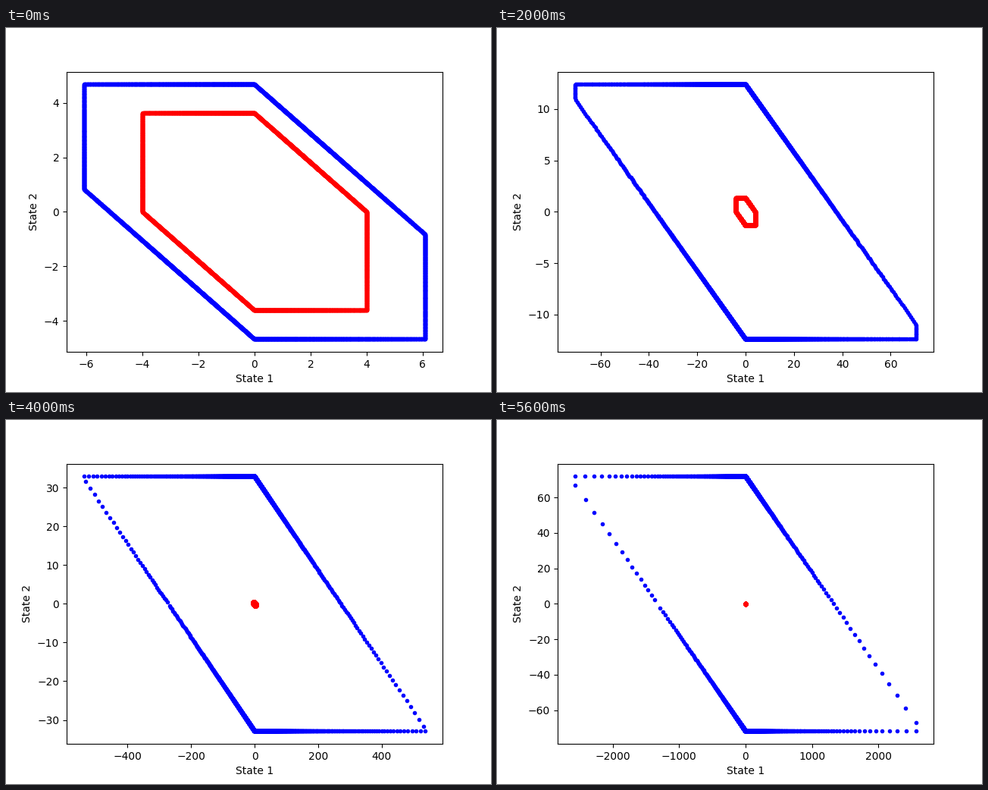
Recreate the animation shown at these times as a matplotlib script. Size 640x480 px, loop 5800 ms.

```python
import numpy as np
import matplotlib.pyplot as plt
from matplotlib.animation import FuncAnimation

FRAMES = 29
INTERVAL = 200
INNER = 4.0    # half-width of the red set
OUTER = 4.24   # base size of the blue set

# One boundary point per tenth of a degree, open at +-180 degrees
theta = np.arange(-1799, 1800) * np.pi / 1800
cos, sin = np.cos(theta), np.sin(theta)

fig, ax = plt.subplots(figsize=(6.4, 4.8), dpi=100)


def hexagon(width, bound, s):
    """Ray hits on |x| <= width, |s y| <= bound, |x + s y| <= bound."""
    gauge = np.maximum.reduce([
        np.abs(cos) / width,
        np.abs(s * sin) / bound,
        np.abs(cos + s * sin) / bound,
    ])
    return cos / gauge, sin / gauge


def draw(i):
    s = np.exp(0.1005 * (i + 1))
    height = OUTER * 1.05 ** (2 * (i + 1))
    bound = s * height

    ax.clear()
    ax.plot(*hexagon(2 * bound - OUTER, bound, s), ".", color="blue")
    ax.plot(*hexagon(INNER, INNER, s), ".", color="red")
    ax.set_xlabel("State 1")
    ax.set_ylabel("State 2")
    return []


anim = FuncAnimation(fig, draw, frames=FRAMES, init_func=lambda: draw(0),
                     interval=INTERVAL, repeat=True, repeat_delay=0)
plt.show()
```
